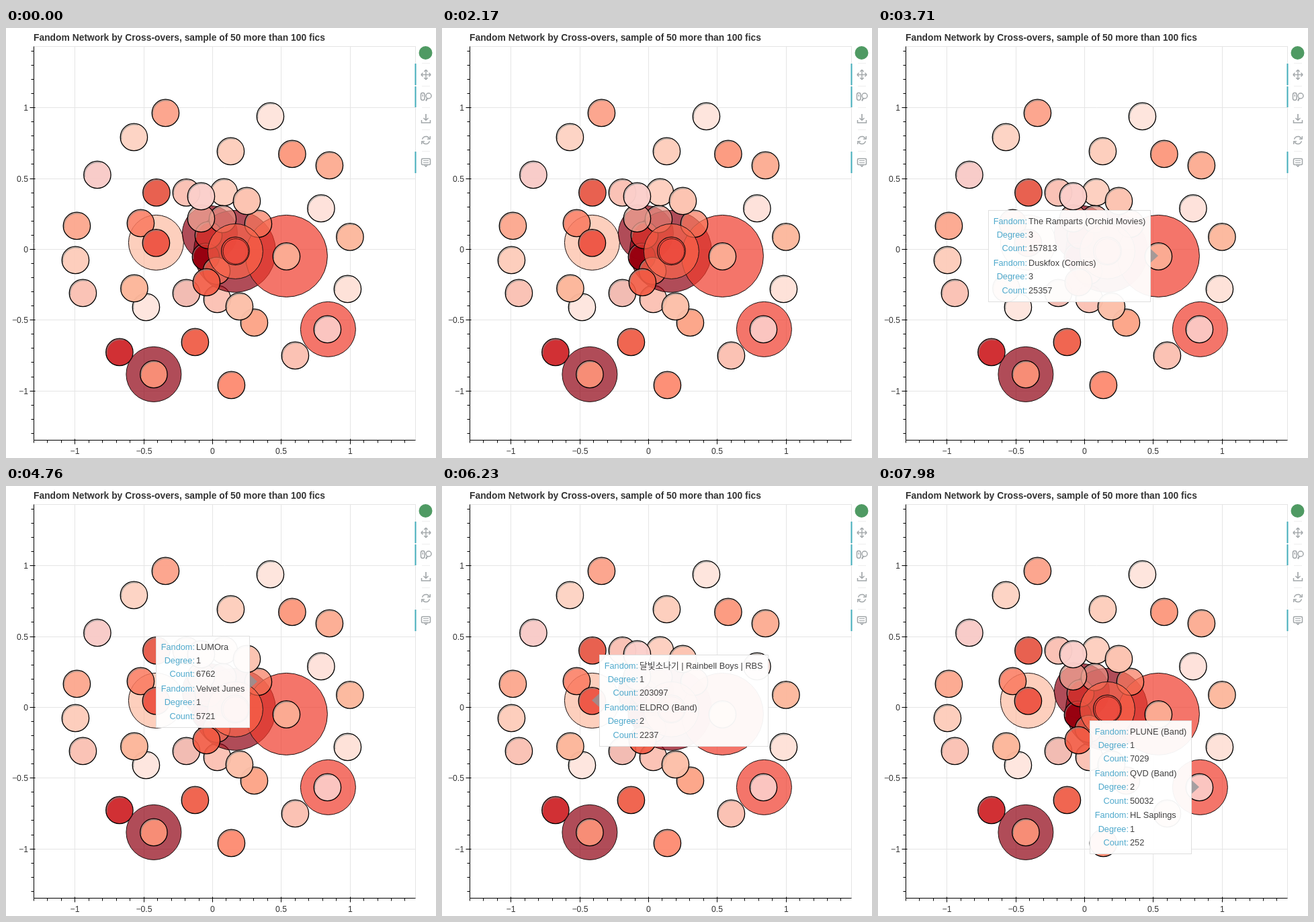
Recreate the animation shown at these times as an HTML page with a canvas. Size 640 px wide and 640 px high, loop 8000 ms.

```html
<!DOCTYPE html>
<html lang="en">
<head>
<meta charset="utf-8">
<title>Fandom network</title>
<style>
  html, body { margin: 0; width: 100%; height: 100%; overflow: hidden; background: #fff; }
  canvas { display: block; width: 640px; height: 640px; }
</style>
</head>
<body>
<canvas id="stage" width="640" height="640"></canvas>
<script>
const LOOP = 8000;
const SANS = '"Liberation Sans", "Noto Sans CJK KR", "Noto Sans CJK", sans-serif';
const PLOT = { left: 41.5, right: 609.5, top: 27.5, bottom: 613.5 };
const stage = document.getElementById('stage').getContext('2d');
const chart = document.createElement('canvas');
chart.width = chart.height = 640;
let g = chart.getContext('2d');

const toX = v => 307.5 + 204.6 * v;
const toY = v => 329.4 - 210.7 * v;

function line(x1, y1, x2, y2, color, width = 1) {
  g.strokeStyle = color;
  g.lineWidth = width;
  g.beginPath();
  g.moveTo(x1, y1);
  g.lineTo(x2, y2);
  g.stroke();
}

function text(str, x, y, size, color, align = 'left', weight = '') {
  g.font = `${weight} ${size}px ${SANS}`;
  g.fillStyle = color;
  g.textAlign = align;
  g.textBaseline = 'alphabetic';
  g.fillText(str, x, y);
}

function disc(x, y, r, fill, alpha, stroke, width = 1) {
  g.beginPath();
  g.arc(x, y, r, 0, Math.PI * 2);
  g.globalAlpha = alpha;
  g.fillStyle = fill;
  g.fill();
  g.globalAlpha = 1;
  if (!stroke) return;
  g.strokeStyle = stroke;
  g.lineWidth = width;
  g.stroke();
}

// A node is a coloured disc with a grey crescent inside its black ring.
function node(x, y, fill, alpha = 0.97) {
  disc(x, y, 20, fill, alpha);
  g.beginPath();
  g.arc(x + 0.4, y + 0.4, 19.2, Math.PI * 0.95, Math.PI * 1.6);
  g.strokeStyle = 'rgba(120,135,135,.6)';
  g.lineWidth = 1.6;
  g.stroke();
  g.beginPath();
  g.arc(x, y, 20.2, 0, Math.PI * 2);
  g.strokeStyle = '#000';
  g.lineWidth = 1.3;
  g.stroke();
}

const hub = (x, y, r, fill) => disc(x, y, r, fill, 0.7, '#1a1010');

function drawAxes() {
  for (let i = -2; i <= 2; i++) {
    const x = Math.floor(toX(i / 2)) + 0.5, y = Math.floor(toY(i / 2)) + 0.5;
    line(x, PLOT.top, x, PLOT.bottom, '#e5e5e5');
    line(PLOT.left, y, PLOT.right, y, '#e5e5e5');
  }
  g.strokeStyle = '#e5e5e5';
  g.strokeRect(PLOT.left, PLOT.top, PLOT.right - PLOT.left, PLOT.bottom - PLOT.top);
}

function drawScales() {
  line(PLOT.left, PLOT.top, PLOT.left, PLOT.bottom, '#000');
  line(PLOT.left, PLOT.bottom, PLOT.right, PLOT.bottom, '#000');
  for (let i = -13; i <= 14; i++) {
    const x = Math.floor(toX(i / 10)) + 0.5, y = Math.floor(toY(i / 10)) + 0.5;
    const major = i % 5 === 0 && Math.abs(i) <= 10;
    const out = major ? 6 : 4, inner = major ? 2 : 0;
    line(x, PLOT.bottom - inner, x, PLOT.bottom + out, '#000');
    line(PLOT.left - out, y, PLOT.left + inner, y, '#000');
    if (!major) continue;
    const label = String(i / 10).replace('-', '\u2212');
    text(label, x, 633.5, 12.2, '#333', 'center');
    text(label, 33, y + 4, 12.2, '#333', 'right');
  }
  text('Fandom Network by Cross-overs, sample of 50 more than 100 fics',
    41, 19, 13.85, '#333', 'left', 'bold');
}

const OUTER = [
  [393, 131, '#fee5dc'], [237, 126, '#fca48c'], [190, 162, '#fdd3c4'], [334, 183, '#fdcebc'],
  [425.5, 187, '#fc997e'], [481, 204, '#fcad93'], [135.5, 218, '#f8cbc8'], [223.5, 244.5, '#e85c4b'],
  [468.5, 268, '#fee2da'], [105, 294, '#fca990'], [511.5, 310.5, '#fcb89d'], [103, 345, '#fdcdbb'],
  [114, 394, '#fac2b4'], [508, 388, '#fee2d8'], [208, 415, '#fee6de'], [190.5, 387, '#fcb69a'],
  [168.5, 482, '#d02a2e'], [281, 467, '#f0624c'], [335, 531, '#fd8d73'], [430, 487, '#fbc1b2'],
  [369, 438, '#fca588'], [268, 394, '#f2bab1'], [314, 403, '#fbc2b4'], [268, 244.5, '#fac1b4'],
  [324, 244, '#fdcfbf']
];

function drawNodes() {
  g.save();
  g.translate(0.4, 0.4);
  OUTER.forEach(n => node(...n));
  hub(223, 319, 41, '#fcbba1');
  node(200, 290, '#fb7a5e', 0.85);
  node(223, 319.5, '#ee5645');
  hub(219.5, 515, 41, '#8f0012');
  node(219.5, 515, '#fa9078');
  hub(479, 448, 41, '#ef3b2c');
  node(478, 448, '#fcc9c4');

  hub(303, 305, 41, '#8f0012');
  hub(340, 332, 61, '#8f0012');
  node(297, 340, '#98000f');
  hub(417, 339, 61, '#ef3b2c');
  node(417, 339.5, '#fcad94');
  node(375, 291, '#f8785c', 0.7);
  node(301, 308, '#e23c32', 0.7);
  node(322, 284, '#ec9284', 0.7);
  node(290, 283, '#f0a595', 0.75);
  node(313, 361, '#f8745a', 0.7);
  hub(341, 332, 41, '#f9644a');
  disc(341, 331.5, 20.8, '#ef4a3c', 0.65, '#1a1010', 1.2);
  disc(341.5, 332, 18.8, '#ef4a3c', 0.4, '#3a1010', 0.9);
  node(298, 378, '#f25942', 0.9);
  node(347, 414, '#fcbfa9');
  node(358, 257, '#fcc3b0');
  node(290, 250, '#fbcfcb');
  g.restore();
}

function drawToolbar() {
  const grey = '#a1a6a9', teal = '#43adba';
  disc(624.5, 37, 10, '#4f9a63', 1);
  [[53, 85], [87, 118], [184, 216]].forEach(([a, b]) => line(609.5, a, 609.5, b, teal, 2));
  [52, 86, 118, 151, 183].forEach(y => line(619, y + 0.5, 631, y + 0.5, '#eee'));

  // pan
  line(618, 69.5, 632, 69.5, grey, 1.4);
  line(625, 62.5, 625, 76.5, grey, 1.4);
  for (let i = 0; i < 4; i++) {
    g.save();
    g.translate(625, 69.5);
    g.rotate(i * Math.PI / 2);
    line(4.5, -2.7, 7.2, 0, grey, 1.4);
    line(4.5, 2.7, 7.2, 0, grey, 1.4);
    g.restore();
  }
  // wheel zoom
  g.strokeStyle = grey;
  g.lineWidth = 1.5;
  g.beginPath();
  g.roundRect(617.5, 96.5, 5.5, 11, 2.7);
  g.stroke();
  line(620.2, 99, 620.2, 102, grey, 1.3);
  disc(629, 101, 4, '#fff', 1, grey, 1.5);
  line(627, 104.5, 625, 108.5, grey, 2);
  // save
  line(625, 128, 625, 137, grey, 1.7);
  line(621.5, 134, 625, 137.5, grey, 1.5);
  line(628.5, 134, 625, 137.5, grey, 1.5);
  g.beginPath();
  g.moveTo(618.5, 137);
  g.lineTo(618.5, 141);
  g.lineTo(631.5, 141);
  g.lineTo(631.5, 137);
  g.stroke();
  // reset
  [0, Math.PI].forEach(turn => {
    g.save();
    g.translate(625, 167);
    g.rotate(turn);
    g.beginPath();
    g.arc(0, 0, 5.6, Math.PI * 1.08, Math.PI * 1.85);
    g.stroke();
    line(6.3, -6, 6.3, -1.6, grey, 1.4);
    line(2, -1.8, 6.5, -1.8, grey, 1.4);
    g.restore();
  });
  // hover
  g.beginPath();
  g.roundRect(618.5, 194.5, 13, 9, 1.5);
  g.stroke();
  line(621, 197.5, 629, 197.5, grey);
  line(621, 200.5, 629, 200.5, grey);
  line(623, 204, 625, 206.5, grey, 1.3);
  line(627, 204, 625, 206.5, grey, 1.3);
}

const RAINBELL = ['달빛소나기 | Rainbell Boys | RBS', 1, 203097];
const ELDRO = ['ELDRO (Band)', 2, 2237];
const FORTYLEAF = ['FORTYLEAF (Band)', 1, 27611];
const LUMORA = ['LUMOra', 1, 6762];
const JUNES = ['Velvet Junes', 1, 5721];
const DUSKFOX = ['Duskfox (Comics)', 3, 25357];

const HOVERS = [
  { from: 3640, to: 3885, x: 417, y: 339,
    rows: [['The Ramparts (Orchid Movies)', 3, 157813], DUSKFOX] },
  { from: 3885, to: 4410, x: 298, y: 378,
    rows: [['Glass Harbor (Movies)', 2, 18420], DUSKFOX, JUNES] },
  { from: 4410, to: 4830, x: 374, y: 291, rows: [LUMORA, JUNES] },
  { from: 4830, to: 5390, x: 358, y: 257,
    rows: [['Stormglass Academy (TV Series)', 2, 9316], LUMORA, JUNES] },
  { from: 5390, to: 6020, x: 268, y: 246, rows: [RAINBELL, LUMORA, JUNES, ELDRO] },
  { from: 6020, to: 6510, x: 223, y: 319, rows: [RAINBELL, ELDRO] },
  { from: 6510, to: 7560, x: 223, y: 319, rows: [RAINBELL, ELDRO, FORTYLEAF] },
  { from: 7560, to: LOOP, x: 478, y: 448,
    rows: [['PLUNE (Band)', 1, 7029], ['QVD (Band)', 2, 50032], ['HL Saplings', 1, 252]] }
];

function drawTooltip({ x, y, rows }) {
  const size = 12.75, labels = ['Fandom:', 'Degree:', 'Count:'];
  g.font = `${size}px ${SANS}`;
  const textWidth = Math.max(...rows.map(r => g.measureText(r[0]).width));
  const w = Math.round(textWidth + 68), h = Math.round(12 + 62.4 * rows.length);
  const side = x > 325 ? -1 : 1;
  const left = side > 0 ? x + 11 : x - 11 - w;
  const top = Math.round(y - h / 2);

  g.fillStyle = 'rgba(144,149,153,.8)';
  g.beginPath();
  g.moveTo(x, y);
  g.lineTo(x + side * 11, y - 10);
  g.lineTo(x + side * 11, y + 10);
  g.fill();

  g.fillStyle = 'rgba(255,255,255,.95)';
  g.fillRect(left, top, w, h);
  g.strokeStyle = '#dedede';
  g.lineWidth = 1;
  g.strokeRect(left + 0.5, top + 0.5, w - 1, h - 1);

  rows.forEach((row, i) => row.forEach((value, k) => {
    const base = top + 20.5 + i * 62.4 + k * 20.4;
    text(labels[k], left + 58, base, size, '#4fa9cc', 'right');
    text(String(value), left + 60, base, size, '#404040');
  }));
}

drawAxes();
drawNodes();
drawScales();
drawToolbar();
g = stage;

function frame(now) {
  const t = now % LOOP;
  g.fillStyle = '#fff';
  g.fillRect(0, 0, 640, 640);
  g.drawImage(chart, 0, 0);
  const hover = HOVERS.find(s => t >= s.from && t < s.to);
  if (hover) drawTooltip(hover);
  requestAnimationFrame(frame);
}
requestAnimationFrame(frame);
</script>
</body>
</html>
```
